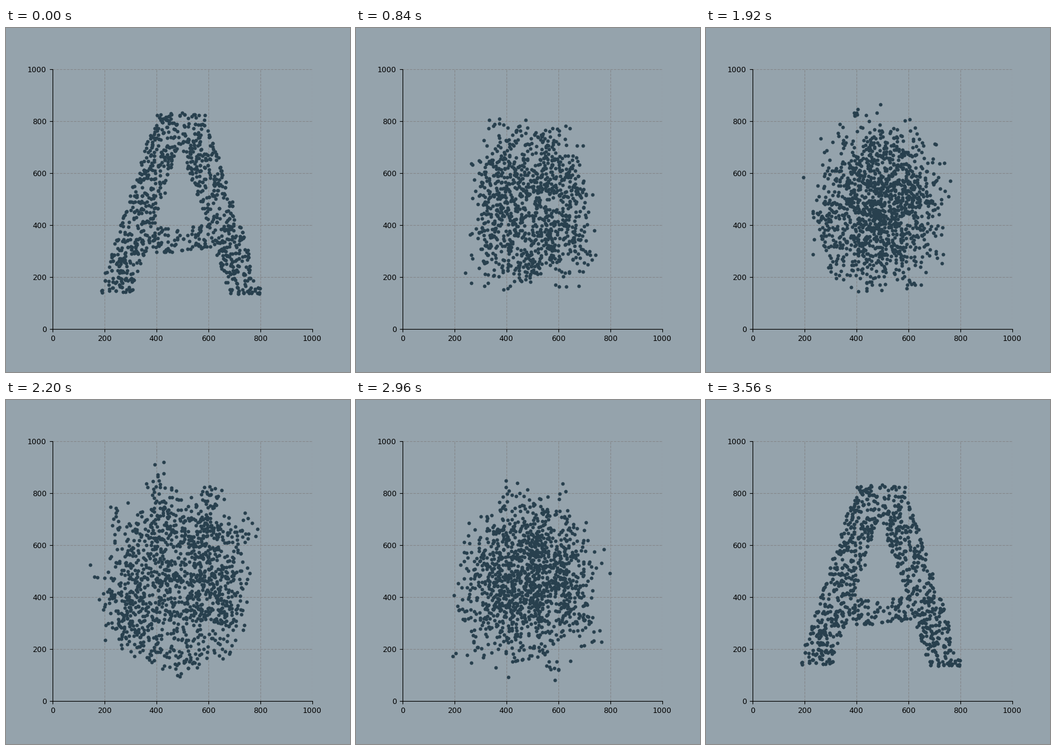
Animation, 576 px wide and 576 px high, one loop 3800 ms. Source, as a matplotlib script:

```python
import numpy as np
import matplotlib.pyplot as plt
from matplotlib.animation import FuncAnimation
from matplotlib.path import Path

BG, INK = "#95a3ac", "#28404e"
HOLD, MORPH, CYCLE, FRAMES = 5, 24, 30, 95
rng = np.random.default_rng(7)


def scatter(n, inside):
    """n uniform random points for which inside(x, y) holds."""
    pts = rng.uniform(30, 970, (n * 12, 2))
    return pts[inside(*pts.T)][:n]


def rounded(x, y, cx, cy, rx, ry, power=5):
    """Superellipse test."""
    return abs((x - cx) / rx) ** power + abs((y - cy) / ry) ** power < 1


def letter_a(x, y):
    dx, rise = abs(x - 492), (y - 135) / 700
    body = (rise > 0) & (rise < 1) & (dx < 315 - 223 * rise)
    gap = dx < 190 * (1 - rise / 0.81)
    bar = (y > 295) & (y < 400)
    return body & (~gap | bar)


def letter_b(x, y):
    stem = (x > 265) & (x < 410) & (y > 142) & (y < 825)
    bowls = rounded(x, y, 265, 660, 460, 165) | rounded(x, y, 265, 320, 492, 178)
    holes = rounded(x, y, 410, 630, 177, 76) | rounded(x, y, 410, 350, 197, 92)
    return stem | ((x > 400) & bowls & ~holes)


def burst(x, y):
    center = np.array([470, 490])
    tips = np.array([(390, 947), (658, 925), (818, 715), (800, 477),
                     (775, 280), (710, 170), (500, 50), (290, 130),
                     (190, 190), (135, 330), (125, 490), (172, 760)])
    mids = (tips + np.roll(tips, -1, axis=0)) / 2
    # Notches between the spikes get deeper towards the top.
    depth = 0.93 - 0.36 * mids[:, 1:] / 1000
    notches = center + (mids - center) * depth
    spikes = center + (tips - center) * 1.04
    outline = np.stack([spikes, notches], axis=1).reshape(-1, 2)
    body = Path(outline).contains_points(np.column_stack([x, y]))
    return body & ~rounded(x, y, 500, 216, 126, 48)


def pair(start, end):
    """Match two clouds at random, reusing points of the smaller one."""
    n = max(len(start), len(end))
    return start[np.arange(n) % len(start)], end[rng.permutation(n) % len(end)]


clouds = [scatter(900, letter_a), scatter(1080, letter_b), scatter(1350, burst)]
clouds.append(clouds[0])
moves = [pair(p, q) for p, q in zip(clouds, clouds[1:])]

plt.rcParams["font.size"] = 9
fig = plt.figure(figsize=(5.76, 5.76), dpi=100, facecolor=BG)
ax = fig.add_axes([0.135, 0.125, 0.755, 0.755], facecolor=BG)
ax.set(xlim=(0, 1000), ylim=(0, 1000))
ax.set_axisbelow(True)
ax.grid(True, linestyle="--", color="gray", alpha=0.75, linewidth=0.8)
ax.spines[["top", "right"]].set_visible(False)
dots, = ax.plot([], [], "o", color=INK, markersize=4.3, markeredgewidth=0)


def draw(frame):
    step, k = divmod(frame, CYCLE)
    if step < len(moves):
        start, end = moves[step]
        t = np.clip((k - HOLD) / MORPH, 0, 1)
        pts = start + (end - start) * t
    else:
        pts = clouds[0]
    dots.set_data(pts[:, 0], pts[:, 1])
    return dots,


anim = FuncAnimation(fig, draw, frames=FRAMES, interval=40,
                     repeat=True, repeat_delay=0)
plt.show()
```
